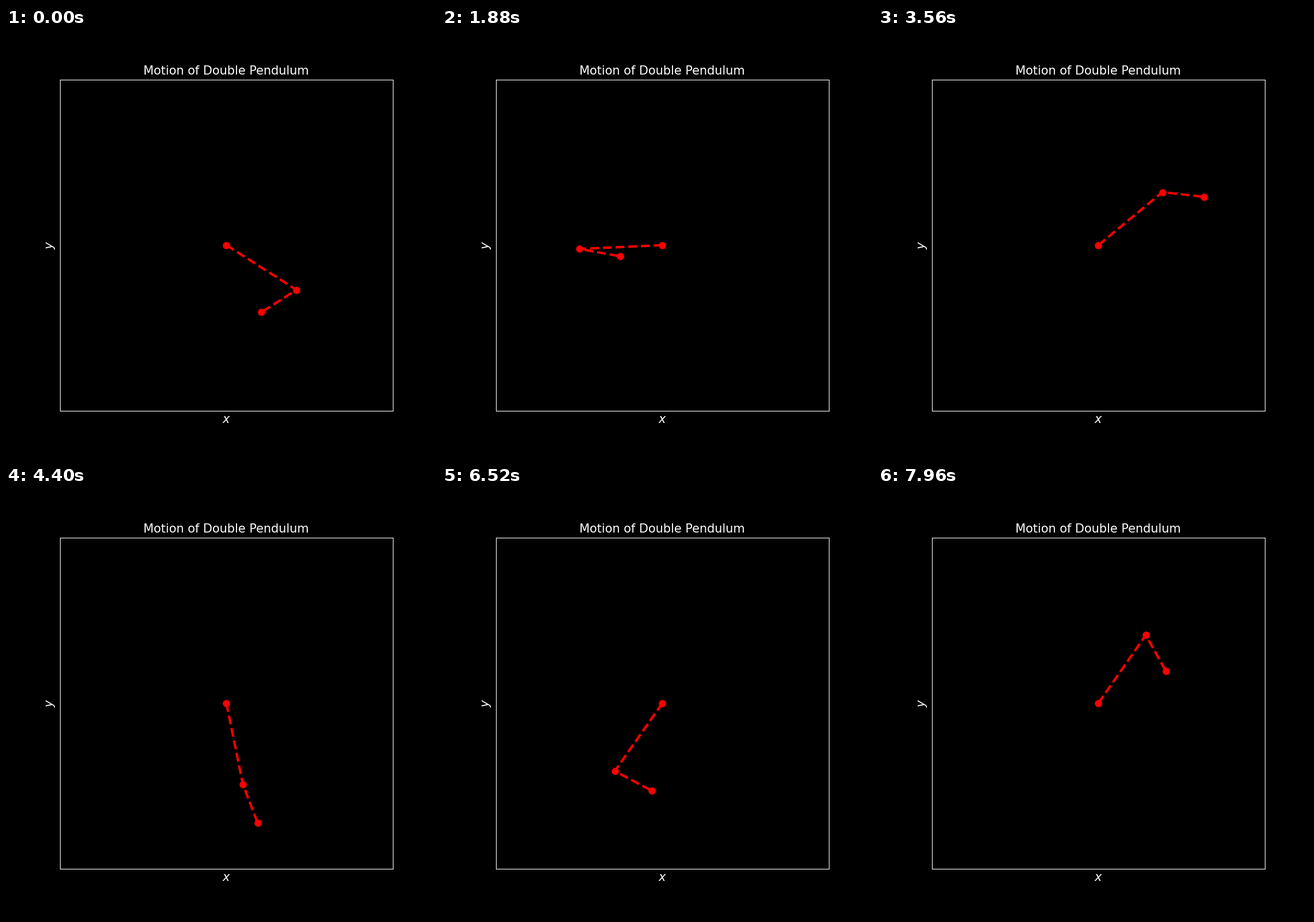
Animation, 748 px wide and 748 px high, one loop 8 s. Source, as a matplotlib script:

```python
import numpy as np
import matplotlib.pyplot as plt
from matplotlib.animation import FuncAnimation

FRAMES, STEP_MS, SUBSTEPS = 200, 40, 40
G, M1, M2, L1, L2 = 9.81, 2, 1, 2, 1
START = [1, -3, -1, 5]  # angle and angular speed of each rod


def slope(s):
    a, va, b, vb = s
    sin, cos = np.sin(a - b), np.cos(a - b)
    mass = M1 + M2 * sin**2
    acc_a = (M2 * G * np.sin(b) * cos
             - M2 * sin * (L1 * va**2 * cos + L2 * vb**2)
             - (M1 + M2) * G * np.sin(a)) / (L1 * mass)
    acc_b = ((M1 + M2) * (L1 * va**2 * sin - G * np.sin(b) + G * np.sin(a) * cos)
             + M2 * L2 * vb**2 * sin * cos) / (L2 * mass)
    return np.array([va, acc_a, vb, acc_b])


def rk4(s, h):
    k1 = slope(s)
    k2 = slope(s + h / 2 * k1)
    k3 = slope(s + h / 2 * k2)
    k4 = slope(s + h * k3)
    return s + h / 6 * (k1 + 2 * k2 + 2 * k3 + k4)


def solve():
    s = np.array(START, float)
    states = [s]
    for _ in range(FRAMES - 1):
        for _ in range(SUBSTEPS):
            s = rk4(s, STEP_MS / 1000 / SUBSTEPS)
        states.append(s)
    return np.array(states)


path = solve()
theta1, theta2 = path[:, 0], path[:, 2]
x1, y1 = L1 * np.sin(theta1), -L1 * np.cos(theta1)
x2, y2 = x1 + L2 * np.sin(theta2), y1 - L2 * np.cos(theta2)

plt.style.use("dark_background")
plt.rcParams["font.family"] = "DejaVu Sans"
fig, ax = plt.subplots(figsize=(7.48, 7.48), dpi=100)
ax.set(xlim=(-4, 4), ylim=(-4, 4), xticks=[], yticks=[])
ax.set_title("Motion of Double Pendulum", fontsize=15)
ax.set_xlabel("$x$", fontsize=15)
ax.set_ylabel("$y$", fontsize=15)
rods, = ax.plot([], [], "ro--", lw=3, markersize=8)


def draw(i):
    rods.set_data([0, x1[i], x2[i]], [0, y1[i], y2[i]])
    return rods,


anim = FuncAnimation(fig, draw, frames=FRAMES, interval=STEP_MS, repeat=True,
                     repeat_delay=0)
plt.show()
```
